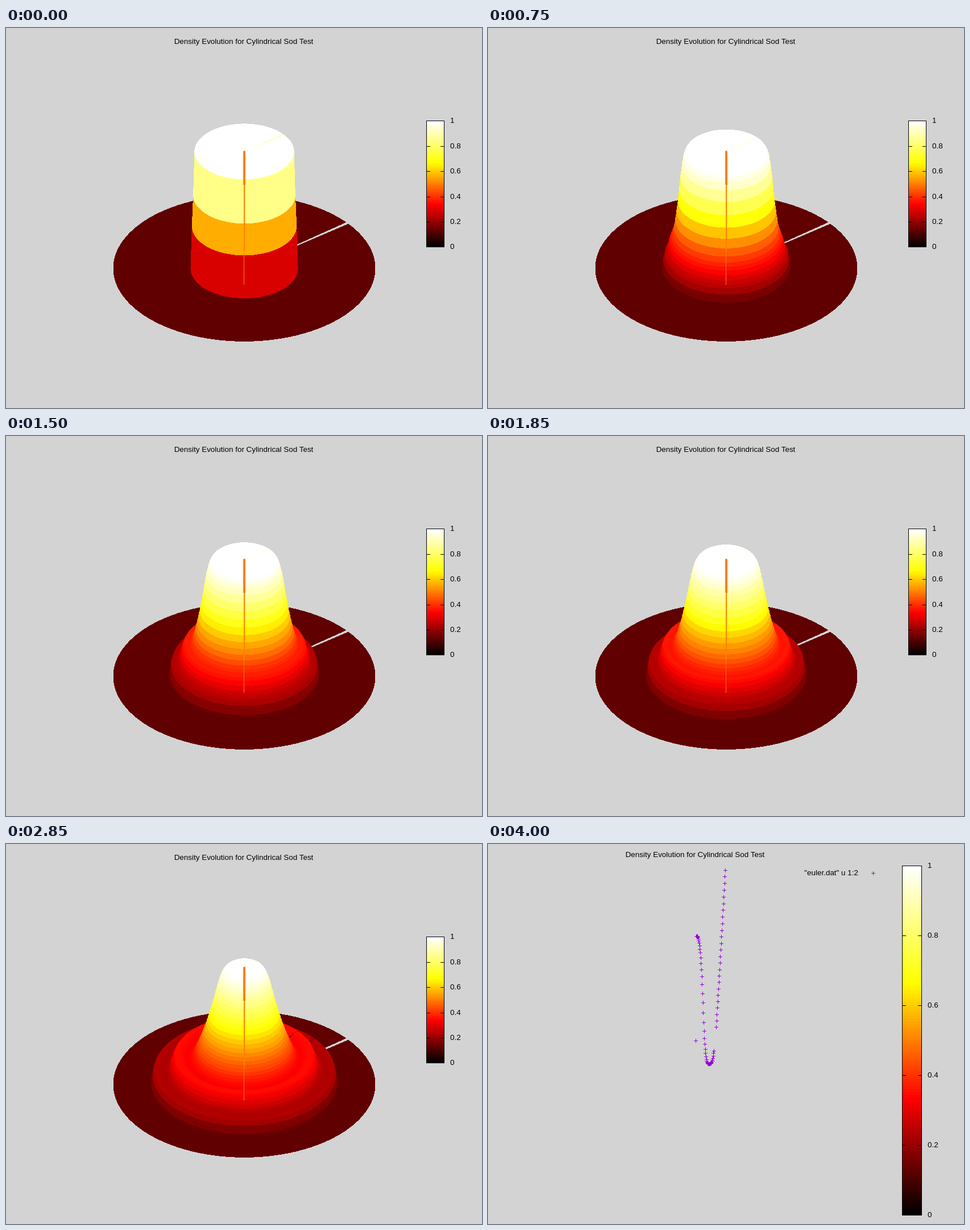
Recreate the animation shown at these times as an HTML page with a canvas. Size 837x669 px, loop 4.05 s.

```html
<!DOCTYPE html>
<html lang="en">
<head>
<meta charset="utf-8">
<title>Density Evolution</title>
<style>
  html, body { margin: 0; width: 100%; height: 100%; overflow: hidden; background: #d3d3d3; }
  canvas, svg { position: absolute; left: 0; top: 0; display: block; }
  text { font: 13.45px "Liberation Sans", Arial, sans-serif; fill: #000; }
  path { fill: none; stroke-width: 1; shape-rendering: crispEdges; }
</style>
</head>
<body>
<canvas id="stage" width="837" height="669"></canvas>
<svg id="overlay" width="837" height="669"></svg>
<script>
const W = 837, H = 669, LOOP = 4050, PLOT_AT = 4000;
const ctx = document.getElementById('stage').getContext('2d');
const overlay = document.getElementById('overlay');

// ---- black-red-yellow-white palette, 128 levels ----
const LEVELS = 128;
const channels = v => [3 * v, 3 * v - 1, 3 * v - 2]
  .map(c => Math.round(255 * Math.min(1, Math.max(0, c))));
const palette = Array.from({ length: LEVELS }, (_, i) => channels(i / (LEVELS - 1)));
const packed = Uint32Array.from(palette, ([r, g, b]) => (255 << 24 | b << 16 | g << 8 | r) >>> 0);
const level = v => Math.max(0, Math.min(LEVELS - 1, Math.floor(v * LEVELS)));

// ---- radial Euler equations: limited slopes, FORCE flux, split source ----
const N = 100, DR = 1 / N, GAMMA = 1.4, CFL = 0.8, STEPS = 64;

function primitive([rho, m, E]) {
  const u = m / rho;
  return { u, p: (GAMMA - 1) * (E - m * u / 2) };
}

function flux(U) {
  const { u, p } = primitive(U);
  return [U[1], U[1] * u + p, u * (U[2] + p)];
}

function waveSpeed(U) {
  const { u, p } = primitive(U);
  return Math.abs(u) + Math.sqrt(GAMMA * p / U[0]);
}

const minmod = (a, b) => a * b <= 0 ? 0 : Math.abs(a) < Math.abs(b) ? a : b;

// Face values of one cell, moved on by half a time step.
function faces(prev, cell, next, ratio) {
  const half = cell.map((q, k) => minmod(q - prev[k], next[k] - q) / 2);
  const left = cell.map((q, k) => q - half[k]);
  const right = cell.map((q, k) => q + half[k]);
  const fl = flux(left), fr = flux(right);
  const shift = fl.map((f, k) => ratio / 2 * (f - fr[k]));
  return { left: left.map((q, k) => q + shift[k]), right: right.map((q, k) => q + shift[k]) };
}

function force(L, R, ratio) {
  const fl = flux(L), fr = flux(R);
  const mid = flux(L.map((q, k) => (q + R[k] - ratio * (fr[k] - fl[k])) / 2));
  return mid.map((f, k) => (f + (fl[k] + fr[k] - (R[k] - L[k]) / ratio) / 2) / 2);
}

function advance(U) {
  U[0] = [U[1][0], -U[1][1], U[1][2]];
  U[N + 1] = U[N].slice();
  const dt = CFL * DR / Math.max(...U.map(waveSpeed)), ratio = dt / DR;
  const V = U.map((cell, i) => faces(U[i - 1] || cell, cell, U[i + 1] || cell, ratio));
  const F = [];
  for (let i = 0; i <= N; i++) F[i] = force(V[i].right, V[i + 1].left, ratio);
  return U.map((cell, i) => {
    if (i < 1 || i > N) return cell;
    const moved = cell.map((q, k) => q - ratio * (F[i][k] - F[i - 1][k]));
    const { u, p } = primitive(moved), r = i * DR;
    const source = [moved[1], moved[1] * u, u * (moved[2] + p)];
    return moved.map((q, k) => q - dt / r * source[k]);
  });
}

function simulate() {
  let U = Array.from({ length: N + 2 }, (_, i) => i < 40 ? [1, 0, 2.5] : [0.125, 0, 0.25]);
  const out = [];
  for (let n = 0; n <= STEPS; n++) {
    U = advance(U);
    const rho = U.slice(0, N + 1).map(c => c[0]);
    rho[0] = rho[1];
    out.push(rho);
  }
  return out;
}
const profiles = simulate();

// ---- surface of revolution, drawn column by column from back to front ----
const CX = 419, CY = 423, RX = 230.5, TILT = 0.559, RISE = 235, BASE = 0.125;
const SLIT = [0.428, 0.451];
const image = ctx.createImageData(W, H);
const pixels = new Uint32Array(image.data.buffer);

function ringSpan(x, dx, i, rho, side) {
  const a = Math.abs(dx), cell = RX / N, r0 = i * cell, r1 = r0 + cell;
  if (r1 <= a) return;
  const inner = Math.max(r0, a);
  const z0 = rho[i] + (rho[i + 1] - rho[i]) * (inner - r0) / cell;
  const d0 = Math.sqrt(inner * inner - a * a), d1 = Math.sqrt(r1 * r1 - a * a);
  const y0 = CY + side * TILT * d0 - RISE * (z0 - BASE);
  const y1 = CY + side * TILT * d1 - RISE * (rho[i + 1] - BASE);
  const color = packed[level((rho[i] + rho[i + 1]) / 2)];
  const end = Math.ceil(Math.max(y0, y1) - 0.5);
  for (let y = Math.ceil(Math.min(y0, y1) - 0.5); y < end; y++) {
    if (side < 0 && dx > 0) {
      const d = d0 + (d1 - d0) * (y + 0.5 - y0) / (y1 - y0);
      const slope = TILT * d / dx;
      if (slope > SLIT[0] && slope < SLIT[1]) continue;
    }
    pixels[y * W + x] = color;
  }
}

function drawSurface(rho) {
  pixels.fill(0xffd3d3d3);
  for (let x = Math.floor(CX - RX); x <= CX + RX; x++) {
    const dx = x + 0.5 - CX;
    for (let i = N - 1; i >= 0; i--) ringSpan(x, dx, i, rho, -1);
    for (let i = 0; i < N; i++) ringSpan(x, dx, i, rho, 1);
  }
  ctx.putImageData(image, 0, 0);
  ctx.fillStyle = '#ff8000';
  ctx.fillRect(418, 216, 2, 1);
  ctx.fillRect(417, 217, 4, 59);
  ctx.fillRect(418, 276, 2, 117);
  ctx.fillRect(418, 393, 1, 59);
}

function drawBar({ x, y, w, h }) {
  for (let row = 0; row < h; row++) {
    ctx.fillStyle = `rgb(${palette[level(1 - (row + 0.5) / h)]})`;
    ctx.fillRect(x, y + row, w, 1);
  }
}

// ---- text, ticks and markers ----
function add(parent, tag, attrs, content = '') {
  const el = document.createElementNS('http://www.w3.org/2000/svg', tag);
  for (const key in attrs) el.setAttribute(key, attrs[key]);
  el.textContent = content;
  return parent.appendChild(el);
}

function addFrame(bar, titleX, titleY) {
  const g = add(overlay, 'g', {});
  const { x, y, w, h } = bar;
  add(g, 'text', { x: titleX, y: titleY, 'text-anchor': 'middle' },
    'Density Evolution for Cylindrical Sod Test');
  let d = `M${x + .5} ${y + .5}h${w - 1}v${h}h${1 - w}z`;
  for (let i = 0; i <= 5; i++) {
    const ty = y + Math.ceil(h * (5 - i) / 5);
    if (i % 5) d += `M${x} ${ty + .5}h7M${x + w - 7} ${ty + .5}h7`;
    add(g, 'text', { x: x + w + 10, y: ty + 4 }, String(i / 5));
  }
  add(g, 'path', { d, stroke: '#000' });
  return g;
}

const surfaceBar = { x: 739, y: 163, w: 32, h: 222 };
const plotBar = { x: 728, y: 38, w: 35, h: 615 };
const surfaceLayer = addFrame(surfaceBar, 418, 28);
const plotLayer = addFrame(plotBar, 364, 23);

const plus = (x, y) => `M${Math.round(x) - 3} ${Math.round(y) + .5}h7M${Math.round(x) + .5} ${Math.round(y) - 3}v7`;
const valley = [346, 162, 162, 162, 162, 163, 164, 167, 170, 174, 179, 185, 191, 200, 210, 221, 233,
  247, 263, 279, 297, 314, 329, 342, 352, 361, 368, 374, 379, 382, 384, 385, 386, 387, 387, 387, 387,
  387, 387, 386, 386, 385, 384, 382, 380, 377, 373, 368, 364];
const column = i => 365 + i * 2 / 3;
let marks = valley.map((y, i) => plus(column(i), y)).join('');
for (let j = 0; j <= 24; j++)
  marks += plus(column(54 + j), 322 - 11.52 * j + 2.5 * Math.sin(Math.PI * j / 24));
add(plotLayer, 'path', { d: marks, stroke: '#9400d3' });
add(plotLayer, 'path', { d: plus(677, 51), stroke: '#5b3b66' });
add(plotLayer, 'text', { x: 651, y: 55, 'text-anchor': 'end' }, '"euler.dat" u 1:2');

// ---- timing: one step per 50 ms slot, with some slots held ----
const held = t => t < 1250 ? [350, 650, 1000].includes(t) : [100, 350].includes((t - 1250) % 550);
const changes = [];
for (let t = 150; t < PLOT_AT; t += 50) if (!held(t)) changes.push(t);

let shown = null;
function show(step) {
  if (step === shown) return;
  shown = step;
  const plot = step < 0;
  surfaceLayer.style.display = plot ? 'none' : '';
  plotLayer.style.display = plot ? '' : 'none';
  if (plot) {
    ctx.fillStyle = '#d3d3d3';
    ctx.fillRect(0, 0, W, H);
  } else {
    drawSurface(profiles[step]);
  }
  drawBar(plot ? plotBar : surfaceBar);
}

const start = performance.now();
function tick() {
  const t = (performance.now() - start) % LOOP;
  show(t >= PLOT_AT ? -1 : changes.filter(c => c <= t).length);
  requestAnimationFrame(tick);
}
tick();
</script>
</body>
</html>
```
